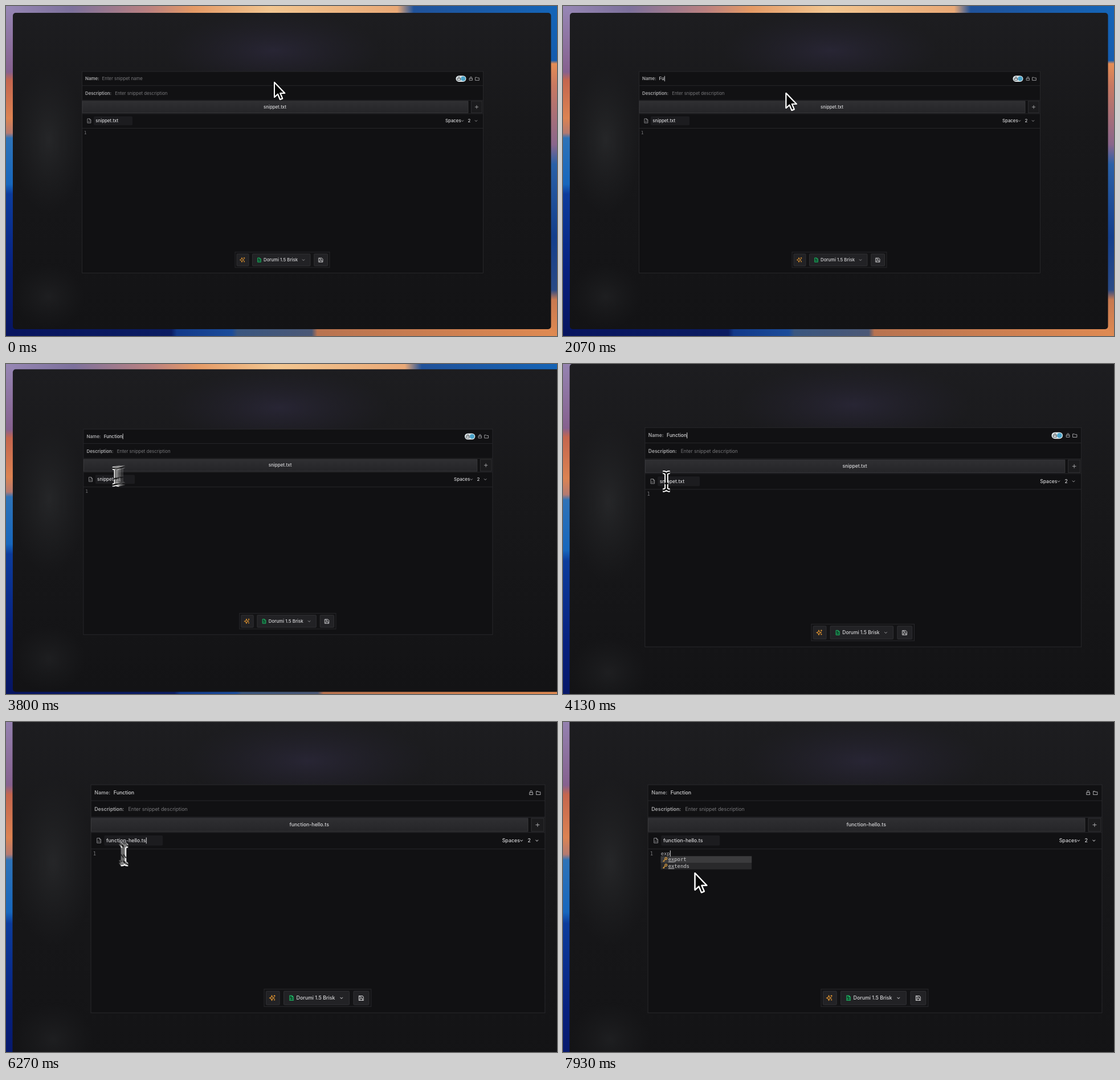
An HTML page that plays this animation: 967 px wide and 579 px high, repeating every 8 s.

```html
<!DOCTYPE html>
<html lang="en">
<head>
<meta charset="utf-8">
<title>Snippet editor</title>
<style>
html, body { margin: 0; width: 100%; height: 100%; overflow: hidden; background: #141416; }
svg { display: block; width: 967px; height: 579px; }
text { font: 500 7.8px Inter, sans-serif; fill: #d6d6d8; white-space: pre; }
.label { font-weight: 600; fill: #a9a9ab; }
.hint { font-weight: 400; fill: #77777a; }
.mid { text-anchor: middle; }
.mono { font: 400 7.8px "DejaVu Sans Mono", monospace; fill: #b4b4b8; }
.line { stroke: #29292c; stroke-width: .9; fill: none; }
.btn { fill: #222225; stroke: #353538; stroke-width: .8; }
.icon { fill: none; stroke: #a5a5a8; stroke-width: .9; stroke-linecap: round; stroke-linejoin: round; }
.caret { fill: #dcdcde; }
</style>
</head>
<body>
<svg viewBox="0 0 967 579" xmlns="http://www.w3.org/2000/svg">
  <defs>
    <linearGradient id="top">
      <stop offset="0" stop-color="#9787b5"/><stop offset=".12" stop-color="#7d719c"/>
      <stop offset=".26" stop-color="#bb8180"/><stop offset=".34" stop-color="#e49a66"/>
      <stop offset=".48" stop-color="#f2c691"/><stop offset=".71" stop-color="#e9a977"/>
      <stop offset=".74" stop-color="#20529a"/><stop offset="1" stop-color="#1465b8"/>
    </linearGradient>
    <linearGradient id="bottom">
      <stop offset="0" stop-color="#07145f"/><stop offset=".3" stop-color="#0b1c62"/>
      <stop offset=".31" stop-color="#12398a"/><stop offset=".41" stop-color="#1b4c9a"/>
      <stop offset=".42" stop-color="#3a567f"/><stop offset=".555" stop-color="#4b5876"/>
      <stop offset=".565" stop-color="#b87350"/><stop offset="1" stop-color="#df8a52"/>
    </linearGradient>
    <linearGradient id="left" x2="0" y2="1">
      <stop offset="0" stop-color="#9787b5"/><stop offset=".2" stop-color="#86618f"/>
      <stop offset=".225" stop-color="#c5664e"/><stop offset=".34" stop-color="#dc8352"/>
      <stop offset=".385" stop-color="#b57a70"/><stop offset=".4" stop-color="#2e73b8"/>
      <stop offset=".54" stop-color="#1767bd"/><stop offset=".57" stop-color="#0c3c9c"/>
      <stop offset=".8" stop-color="#07207f"/><stop offset="1" stop-color="#07145f"/>
    </linearGradient>
    <linearGradient id="right" x2="0" y2="1">
      <stop offset="0" stop-color="#1465b8"/><stop offset=".165" stop-color="#155cae"/>
      <stop offset=".175" stop-color="#e58d55"/><stop offset=".24" stop-color="#c97961"/>
      <stop offset=".42" stop-color="#8a668c"/><stop offset=".48" stop-color="#2a61a8"/>
      <stop offset=".7" stop-color="#143f8c"/><stop offset=".86" stop-color="#294a86"/>
      <stop offset=".89" stop-color="#c87950"/><stop offset="1" stop-color="#df8a52"/>
    </linearGradient>
    <linearGradient id="base" x2="0" y2="1">
      <stop offset="0" stop-color="#1d1d20"/><stop offset=".35" stop-color="#18181a"/>
      <stop offset="1" stop-color="#131315"/>
    </linearGradient>
    <radialGradient id="violet">
      <stop offset="0" stop-color="#2a2738" stop-opacity=".85"/><stop offset="1" stop-color="#24222e" stop-opacity="0"/>
    </radialGradient>
    <radialGradient id="gray">
      <stop offset="0" stop-color="#2a2b2d" stop-opacity=".75"/><stop offset="1" stop-color="#232426" stop-opacity="0"/>
    </radialGradient>
    <linearGradient id="tab" x2="0" y2="1">
      <stop offset="0" stop-color="#2f2f32"/><stop offset="1" stop-color="#252528"/>
    </linearGradient>
    <path id="chevron" class="icon" d="M-1.8-.8L0 1 1.8-.8"/>
    <path id="file" d="M-2.7-3.7H.8L2.9-1.6V3.7H-2.7ZM.8-3.7V-1.6H2.9M-.9 .4L-1.6 1.2-.9 2M1 .4L1.7 1.2 1 2"/>
    <path id="lock" d="M-2.5-.3H2.5V3H-2.5ZM-1.5-.3V-1.5A1.5 1.5 0 0 1 1.5-1.5V-.3"/>
    <g id="key" fill="none" stroke="#c8923e" stroke-width="1.3">
      <circle cx="1.5" cy="-1.6" r="1.6"/><path d="M.3-.3L-3.2 3.2M-2 2L-.9 3"/>
    </g>
    <path id="arrow" d="M1 2V28L7 22.5 11 32 15.2 30.3 11.2 21H19.2Z" fill="#050505" stroke="#fff" stroke-width="2" stroke-linejoin="round"/>
    <path id="beamLine" d="M-5.5-14.5Q-1-14.5 0-11.5 1-14.5 5.5-14.5M0-11.5V11.5M-5.5 14.5Q-1 14.5 0 11.5 1 14.5 5.5 14.5M-2.5 3.5H2.5"/>
    <g id="beam" fill="none">
      <use href="#beamLine" stroke="#fff" stroke-width="5.6"/>
      <use href="#beamLine" stroke="#080808" stroke-width="2.4"/>
    </g>
  </defs>

  <g id="scene">
    <path fill="url(#left)" d="M0 0H14V579H0Z"/>
    <path fill="url(#right)" d="M954 0H967V579H954Z"/>
    <path fill="url(#top)" d="M0 0H967L955 14H13Z"/>
    <path fill="url(#bottom)" d="M0 579L13 565H955L967 579Z"/>

    <rect x="12" y="12" width="944.5" height="555" rx="5" fill="url(#base)"/>
    <ellipse cx="470" cy="78" rx="190" ry="66" fill="url(#violet)"/>
    <ellipse cx="75" cy="235" rx="63" ry="130" fill="url(#gray)"/>
    <ellipse cx="75" cy="510" rx="63" ry="57" fill="url(#gray)" opacity=".6"/>

    <rect x="133.5" y="115" width="704" height="353.5" fill="#111114" class="line" style="fill:#111113"/>
    <path class="line" d="M133.5 139.7H837.5M133.5 165.4H837.5M133.5 189H837.5M133.5 214.5H837.5"/>

    <text class="label" x="139" y="130.3">Name:</text>
    <text id="name" x="168.6" y="130.3"></text>
    <text class="label" x="139" y="155.8">Description:</text>
    <text class="hint" x="191.3" y="155.8">Enter snippet description</text>

    <g id="pill">
      <rect x="789.5" y="122.3" width="18" height="10.6" rx="5.3" fill="#dfe7ea"/>
      <use href="#lock" x="795" y="127.3" class="icon" style="stroke:#4a4d50"/>
      <circle cx="802.3" cy="127.6" r="4" fill="#4aa3c9"/>
    </g>
    <use href="#lock" x="816" y="127.3" class="icon"/>
    <path class="icon" d="M824 125.2H826.4L827.3 126.1H830.3V130.4H824Z"/>

    <rect x="134" y="167" width="677" height="20.4" fill="url(#tab)" stroke="#3c3c3f" stroke-width=".8"/>
    <text id="tabName" class="mid" x="472" y="179.5"></text>
    <rect x="816.3" y="167" width="19.4" height="20.4" class="btn" style="fill:#1b1b1d"/>
    <path class="icon" d="M823.3 177.2H828.7M826 174.5V179.9"/>

    <rect id="field" x="154" y="193.6" height="15.6" rx="2" fill="#1c1c1f"/>
    <use href="#file" x="146" y="201.5" class="icon" style="stroke-width:.75"/>
    <text id="fileName" x="157.3" y="204.3"></text>
    <text x="771" y="204.3">Spaces</text>
    <use href="#chevron" x="801" y="201.5"/>
    <text x="810.6" y="204.3">2</text>
    <use href="#chevron" x="825" y="201.5"/>

    <text class="mono" x="136.8" y="224.6" style="fill:#78787b">1</text>
    <text id="code" class="mono" x="153.5" y="224.4"></text>

    <rect x="402" y="431.8" width="166" height="27" fill="#131315" class="line" style="fill:#131315"/>
    <rect x="405" y="435" width="21" height="21" class="btn" rx="1"/>
    <path d="M414 441.5L415 444.5 418 445.5 415 446.6 414 449.5 412.9 446.6 410.3 445.5 412.9 444.5ZM418 441V443.6M416.7 442.3H419.3M418 447.4V449.4M417 448.4H419" fill="none" stroke="#e3952f" stroke-width="1" stroke-linejoin="round"/>
    <rect x="432.5" y="435" width="101.5" height="21" class="btn" rx="1"/>
    <use href="#file" x="444.4" y="445.6" fill="#0c4a2c" stroke="#22b766" stroke-width=".9"/>
    <text x="452" y="448.3">Dorumi 1.5 Brisk</text>
    <use href="#chevron" x="522" y="445.6"/>
    <rect x="540.7" y="435" width="23.8" height="21" class="btn" rx="1"/>
    <path class="icon" style="stroke:#d0d0d2" d="M549 442.2H554.2L556 444V449.2H549ZM550.6 449V446.2H554.4V449M550.6 442.4V444.2H553.4"/>

    <g id="popup">
      <rect x="153.4" y="225.8" width="141" height="20.4" fill="#29292b"/>
      <rect x="153.4" y="225.8" width="141" height="10.2" fill="#3b3b3d"/>
      <use href="#key" x="160" y="231"/>
      <use href="#key" x="160" y="241.2"/>
      <text class="mono" x="165" y="233.4" style="fill:#d2d2d4"><tspan text-decoration="underline">ex</tspan>port</text>
      <text class="mono" x="165" y="243.7" style="fill:#d2d2d4"><tspan text-decoration="underline">ex</tspan>tends</text>
    </g>
    <rect id="caret" class="caret" width=".9" height="9.4"/>
    <g id="cursor"></g>
  </g>
</svg>
<script>
const LOOP = 8000, BLUR = 6;
const $ = id => document.getElementById(id);
const clamp = (v, lo, hi) => Math.min(hi, Math.max(lo, v));
const ease = (t, from, to) => {
  const u = clamp((t - from) / (to - from), 0, 1);
  return u * u * (3 - 2 * u);
};
const show = (el, on) => el.setAttribute('visibility', on ? 'visible' : 'hidden');
const setText = (el, s) => { if (el.textContent !== s) el.textContent = s; };
const typed = (word, t, start, step) =>
  word.slice(0, clamp(Math.floor((t - start) / step) + 1, 0, word.length));

// Pointer moves: start, end, destination
const moves = [
  [350, 1090, 390.5, 151],
  [3100, 3965, 168, 201.5],
  [5940, 6630, 205.5, 250]
];
function pointer(t) {
  let x = 470, y = 132;
  for (const [from, to, px, py] of moves) {
    const k = ease(t, from, to);
    x += (px - x) * k;
    y += (py - y) * k;
  }
  return [x, y];
}

const ghosts = Array.from({ length: BLUR }, (_, i) => {
  const el = document.createElementNS('http://www.w3.org/2000/svg', 'use');
  el.setAttribute('opacity', 1 / (i + 1));
  return $('cursor').appendChild(el);
});

function fileAt(t) {
  if (t < 4540) return ['snippet', '.txt'];
  const ext = t < 5830 ? '.txt' : t < 5930 ? '.tx' : t < 6040 ? '.t' : '.ts';
  return [typed('function-hello', t, 4540, 90), ext];
}

function placeCaret(el, chars, t, lastKey) {
  const x = +el.getAttribute('x') + (chars ? el.getSubStringLength(0, chars) : 0);
  $('caret').setAttribute('x', x + .2);
  $('caret').setAttribute('y', el.getAttribute('y') - 7.5);
  show($('caret'), t < lastKey || (t - lastKey) % 1060 < 530);
}

function draw(t) {
  const zoom = ease(t, 3580, 4480), s = 1 + .132 * zoom;
  $('scene').setAttribute('transform', `translate(${-2.1 * zoom} ${-20.1 * zoom}) scale(${s})`);

  const name = typed('Function', t, 1890, 115);
  setText($('name'), name || 'Enter snippet name');
  $('name').setAttribute('class', name ? '' : 'hint');
  show($('pill'), t < 4250);

  const [stem, ext] = fileAt(t), file = stem + ext;
  setText($('tabName'), file);
  setText($('fileName'), file);
  $('field').setAttribute('width', Math.max(68, 6 + file.length * 5));

  const code = t < 7520 ? '' : t < 7660 ? 'e' : t < 7850 ? 'ex' : 'exp';
  setText($('code'), code);
  show($('popup'), t >= 7750);

  if (t < 1250) show($('caret'), false);
  else if (t < 4150) placeCaret($('name'), name.length, t, t < 1890 ? 1250 : 2695);
  else if (t < 6850) placeCaret($('fileName'), t < 5730 ? stem.length : file.length, t, t < 4540 ? 4150 : 6040);
  else placeCaret($('code'), code.length, t, t < 7520 ? 6850 : 7850);

  const shape = t >= 3720 && t < 7750 ? '#beam' : '#arrow';
  ghosts.forEach((el, i) => {
    const [x, y] = pointer(t - i * 8);
    el.setAttribute('href', shape);
    el.setAttribute('transform', `translate(${x} ${y})`);
  });
}

const begin = performance.now();
function tick() {
  draw((performance.now() - begin) % LOOP);
  requestAnimationFrame(tick);
}
tick();
</script>
</body>
</html>
```
